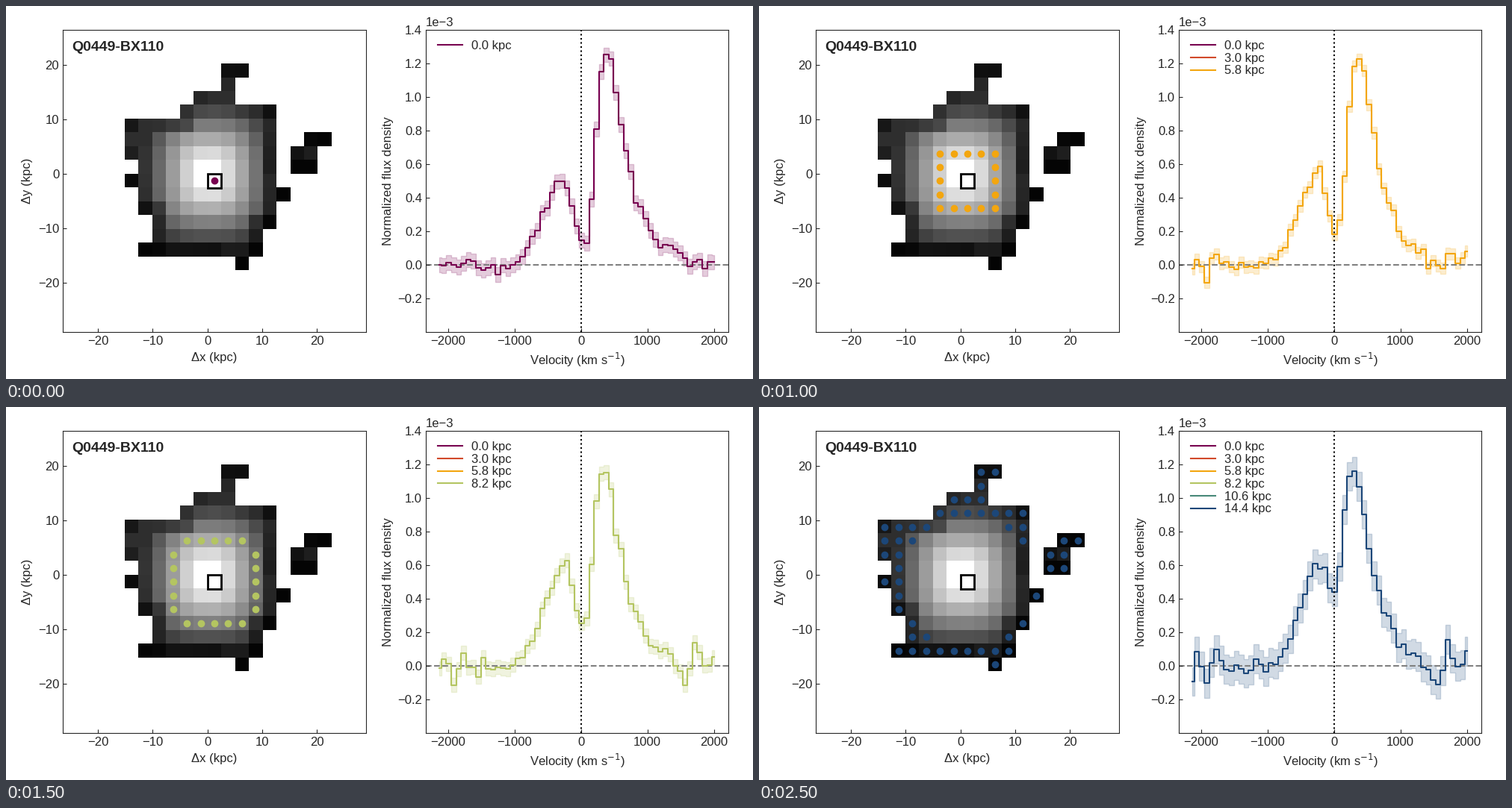
Write a matplotlib script that moves like this. It is 1000 px wide and 500 px high and loops after 3 s.

```python
import matplotlib.pyplot as plt
import numpy as np
from matplotlib.animation import FuncAnimation
from matplotlib.lines import Line2D
from matplotlib.patches import Rectangle

W, H = 1000, 500
INK = "0.15"
CELL = 2.52                 # kpc per map cell
CX, CY = 1.28, -1.28        # centre of the map in kpc
RING_EDGES = [-1, 0.5, 1.5, 2.9, 3.7, 4.5, 99]

plt.rcParams.update({
    "font.family": "Liberation Sans", "font.size": 12,
    "text.color": INK, "axes.labelcolor": INK, "axes.edgecolor": INK,
    "xtick.color": INK, "ytick.color": INK,
    "xtick.direction": "in", "ytick.direction": "in",
    "axes.linewidth": 0.8,
})

fig = plt.figure(figsize=(W / 100, H / 100), dpi=100)
map_ax = fig.add_axes([0.076, 0.126, 0.406, 0.81])
spec_ax = fig.add_axes([0.562, 0.126, 0.405, 0.81])


def label(x, y, text, **style):
    """Text with its left baseline at stage pixel (x, y)."""
    return fig.text(x / W, 1 - y / H, text, **style)


# Map: occupied cells as blocks (left, right, bottom, top), centre cell at 0, 0
LOW, SIZE = -6, 15
blocks = [
    (-6, 4, 2, 4), (-5, 4, -2, 1), (-4, 4, -3, -3), (-4, 3, -4, -4),
    (-5, 3, -5, -5), (2, 2, -6, -6), (-2, 4, 5, 5), (-1, 1, 6, 6),
    (1, 1, 7, 8), (2, 2, 8, 8), (-6, -6, 0, 0), (5, 5, -1, -1),
    (6, 7, 1, 2), (7, 8, 3, 3),
]
occupied = np.zeros((SIZE, SIZE), bool)
for left, right, bottom, top in blocks:
    occupied[bottom - LOW:top - LOW + 1, left - LOW:right - LOW + 1] = True

j, i = np.mgrid[LOW:LOW + SIZE, LOW:LOW + SIZE]
padded = np.pad(occupied.astype(int), 1)
neighbours = sum(padded[a:a + SIZE, b:b + SIZE]
                 for a in range(3) for b in range(3)) - 1

# Boxy radial glow; cells on the rim are dimmer the fewer neighbours they have
radius = (np.abs(1.1 * (i + 0.4)) ** 3 + np.abs(j - 0.45) ** 3) ** (1 / 3)
glow = np.clip(285 - 46 * radius, 45, 255)
rim = np.clip(13 * (neighbours - 2.6) + 3 * j - i, 4, 255)
gray = np.where(neighbours < 8, np.minimum(glow, rim), glow)

lo, hi = (LOW - 0.5) * CELL, (LOW + SIZE - 0.5) * CELL
map_ax.imshow(np.where(occupied, gray, np.nan), cmap="gray", vmin=0, vmax=250,
              origin="lower", interpolation="nearest", aspect="auto",
              extent=[CX + lo, CX + hi, CY + lo, CY + hi])
map_ax.add_patch(Rectangle((CX - CELL / 2, CY - CELL / 2), CELL, CELL,
                           fill=False, ec="black", lw=2, zorder=3))
map_ax.set(xlim=(CX - 11 * CELL, CX + 11 * CELL),
           ylim=(CY - 11 * CELL, CY + 11 * CELL),
           xticks=range(-20, 21, 10), yticks=range(-20, 21, 10))
map_ax.set_xlabel("Δx (kpc)", labelpad=5)
map_ax.set_ylabel("Δy (kpc)", labelpad=5)
label(88.5, 60, "Q0449-BX110", size=14, weight="bold")

# Spectrum axes, flux in units of 1e-5
bins = np.arange(57)
velocity = np.linspace(-2135, 2011, len(bins))
levels = np.arange(-20, 141, 20)
spec_ax.set(xlim=(-2333, 2219), ylim=(-39.8, 140),
            xticks=range(-2000, 2001, 1000), yticks=levels,
            xlabel="Velocity (km s$^{-1}$)", ylabel="Normalized flux density")
spec_ax.set_yticklabels([f"{v / 100:.1f}".replace("-", "\u2212") for v in levels])
spec_ax.axhline(0, color="gray", ls="--", lw=1.5, zorder=1.5)
spec_ax.axvline(0, color="black", ls=":", lw=1.5, zorder=2.5)
label(562, 27, "1e\u22123")

# Wiggle of the far wings, stronger in the outer rings
wiggle = np.interp(bins, [0, 1, 3, 5, 8, 12, 47, 50, 52, 54, 56],
                   [-9, 15, -14, 12, -6, 0, 0, -19, 16, 0, 6])


def blue_peak(center, height):
    d = bins - center
    return height * np.exp(-0.5 * (d / np.where(d < 0, 4, 2.25)) ** 2)


def red_peak(center, height):
    """Steep cubic rise, then a rounded top with an exponential tail."""
    d = bins - center
    rise = 0.028 * np.abs(d) ** 3
    tail = 0.26 * (np.hypot(d, 1.29) - 1.29)
    return height * np.exp(-np.where(d < 0, rise, tail))


ring_artists, legend_rows = [], []


def add_ring(distance, color, error, blue, red, wiggle_size):
    n = len(ring_artists)
    cell_distance = np.hypot(i, j)
    inside = (occupied & (cell_distance > RING_EDGES[n])
              & (cell_distance < RING_EDGES[n + 1]))
    noise = np.random.default_rng(n).normal(0, 2.5, len(bins))
    flux = blue_peak(*blue) + red_peak(*red) + wiggle_size * wiggle + noise

    dots, = map_ax.plot(i[inside] * CELL + CX, j[inside] * CELL + CY, "o",
                        color=color, ms=6, mew=1, zorder=4)
    band = spec_ax.fill_between(velocity, flux - error, flux + error,
                                step="mid", color=color, alpha=0.2, lw=1)
    line, = spec_ax.step(velocity, flux, where="mid", color=color, lw=1.5)
    ring_artists.append([dots, band, line])

    y = 52.3 + 16.65 * n
    key = Line2D([577.5 / W, 610.5 / W], [1 - y / H] * 2, color=color, lw=1.5)
    fig.add_artist(key)
    legend_rows.append([key, label(623, y + 5.7, f"{distance:.1f} kpc")])


add_ring(0.0, "#780050", 4.4, (25.3, 50), (34.5, 125), 0)
add_ring(3.0, "#d14a2b", 2.7, (25.4, 52), (34.5, 123), 0.15)
add_ring(5.8, "#f3a60f", 3.4, (25.8, 54), (34.2, 122), 0.3)
add_ring(8.2, "#b4c561", 4.2, (25.6, 59), (33.9, 115), 0.7)
add_ring(10.6, "#478978", 6.8, (26.1, 62), (33.3, 120), 1.1)
add_ring(14.4, "#1c4779", 8.6, (26.3, 62), (33.2, 116), 0.8)


def update(frame):
    for n, (ring, row) in enumerate(zip(ring_artists, legend_rows)):
        for artist in ring:
            artist.set_visible(n == frame)
        for artist in row:
            artist.set_visible(n <= frame)


animation = FuncAnimation(fig, update, frames=len(ring_artists), interval=500,
                          init_func=lambda: update(0), repeat=True, repeat_delay=0)
plt.show()
```
